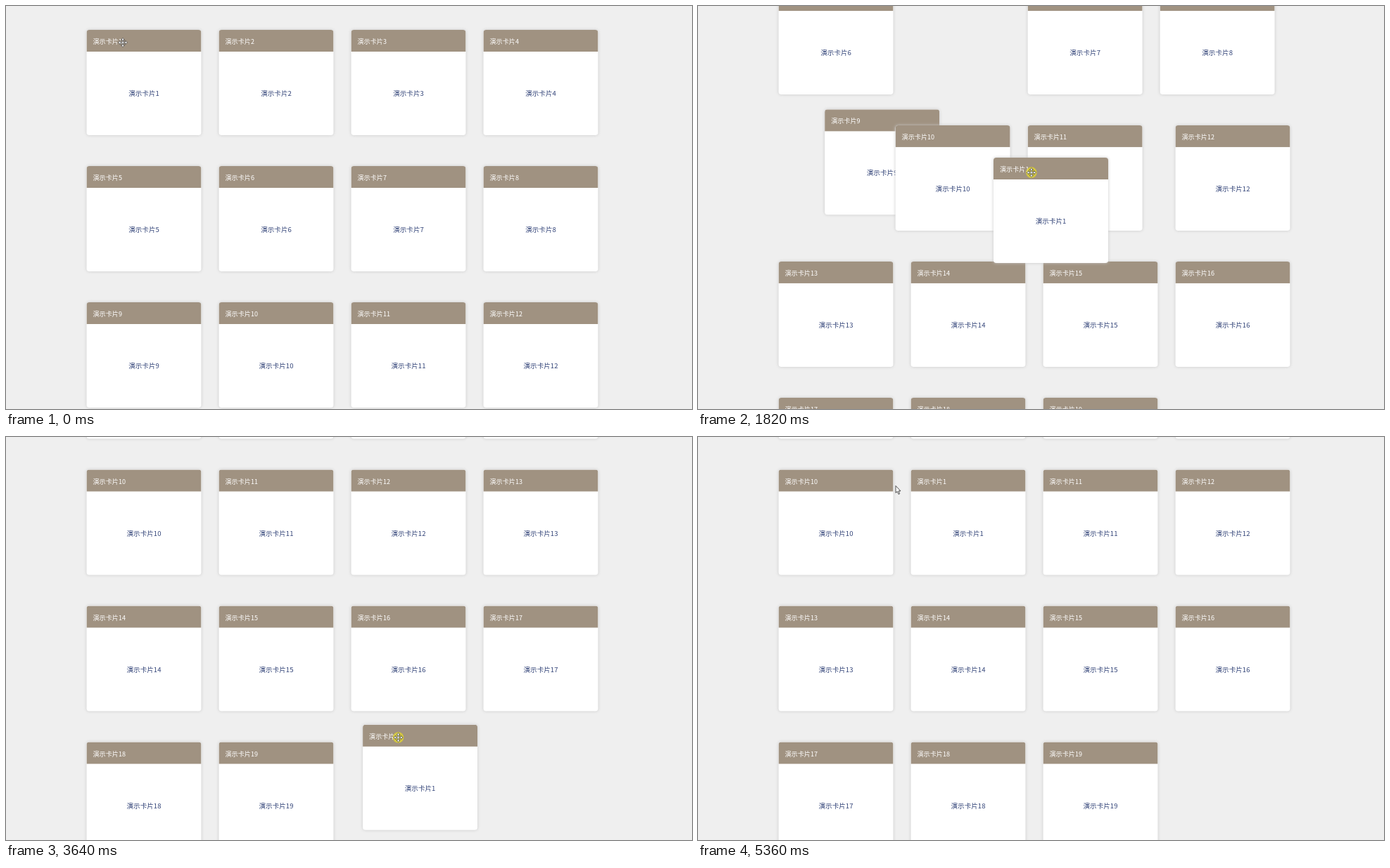
These frames come from a looping animation (975 px wide and 574 px high, 5.86 s). An HTML page:

```html
<!DOCTYPE html>
<html lang="zh-CN">
<head>
<meta charset="utf-8">
<title>卡片拖拽排序</title>
<style>
  html, body { margin: 0; width: 100%; height: 100%; overflow: hidden; }
  #stage { position: relative; width: 975px; height: 574px; overflow: hidden; background: #efefef;
    font-family: "Noto Sans CJK SC", "Noto Sans CJK", "Noto Sans", sans-serif; }
  .card { position: absolute; left: 0; top: 0; width: 163px; height: 150px; border-radius: 4px;
    background: #fff; box-shadow: 0 0 4px #c8c8c8; overflow: hidden; white-space: nowrap; }
  .head { height: 31.25px; line-height: 32.5px; padding-left: 9px; background: #a09281;
    color: #fff; font-size: 9.1px; }
  .body { height: 118.75px; line-height: 118.5px; text-align: center; color: #35467a; font-size: 9.6px; }
  svg { position: absolute; left: 0; top: 0; }
</style>
</head>
<body>
<div id="stage">
  <svg width="975" height="574">
    <g id="cursor">
      <circle id="press" r="7.8" fill="#ece020" fill-opacity=".65"/>
      <path id="move" fill="#fff" stroke="#333" stroke-width=".7"
        d="M0-6.5 2.5-3.7H.8V-.8H3.7V-2.5L6.5 0 3.7 2.5V.8H.8V3.7H2.5L0 6.5-2.5 3.7H-.8V.8H-3.7V2.5L-6.5 0-3.7-2.5V-.8H-.8V-3.7H-2.5Z"/>
      <path id="arrow" fill="#fff" stroke="#222" stroke-width=".8"
        d="M0 0V10L2.3 8 4 12 5.6 11.3 4 7.4H7Z"/>
    </g>
  </svg>
</div>
<script>
const LOOP = 5860, FRAME = 60, CARDS = 19, COLUMNS = 4;
const SLIDE = 300, TICK = 62.58, TICK_TIME = 150;
const W = 163, H = 150, HEAD = 31.25;
const PRESS = 370, RELEASE = 5000;
const GRIP = [51.5, 18], LEAD = 16;

const slotPos = s => [114.5 + 188 * (s % COLUMNS), 34 + 194 * Math.floor(s / COLUMNS)];

// Time and position of the dragged card on the screen
const drag = [
  [500, ...slotPos(0)],
  [1130, 322, 172],
  [1390, 373.5, 175.5],
  [1810, 420, 216],
  [2410, 574, 262],
  [2500, 592, 285],
  [3010, 530, 370],
  [3640, 505, 410],
  [4090, 287.5, 154.5],
  [4220, 258, 96],
  [4720, 298, 50],
  [RELEASE, 298, 50],
  [5330, 302.5, 46.5]
];

// Pointer once it has let go
const leave = [[RELEASE, 349.5, 68], [5220, 235, 69], [5350, 281, 69.5]];

// When the dragged card claims a new slot
const claims = [[1223, 5], [1776, 10], [2227, 14], [3100, 18], [3874, 14], [4024, 13], [4225, 9]];

const wheelTicks = [1220, 1364, 1480, 1590, 1795, 2600];

const $ = id => document.getElementById(id);
const clamp = v => Math.min(1, Math.max(0, v));
const mix = (a, b, p) => a + (b - a) * p;
const smooth = u => u * u * (3 - 2 * u);

// CSS "ease": cubic-bezier(.25, .1, .25, 1)
function ease(x) {
  if (x <= 0 || x >= 1) return clamp(x);
  let lo = 0, hi = 1;
  for (let i = 0; i < 20; i++) {
    const s = (lo + hi) / 2;
    if (.75 * s * (1 - s) + s ** 3 < x) lo = s; else hi = s;
  }
  return .3 * lo * (1 - lo) ** 2 + 3 * lo * lo * (1 - lo) + lo ** 3;
}

// Monotone cubic through one column of a list of keys
function track(keys, t, col) {
  const last = keys.length - 1;
  if (t <= keys[0][0]) return keys[0][col];
  if (t >= keys[last][0]) return keys[last][col];
  const i = keys.findIndex(k => k[0] > t) - 1;
  const secant = j => j < 0 || j >= last ? 0 : (keys[j + 1][col] - keys[j][col]) / (keys[j + 1][0] - keys[j][0]);
  const slope = j => {
    const a = secant(j - 1), b = secant(j);
    return a * b > 0 ? 2 * a * b / (a + b) : 0;
  };
  const [p, q] = [keys[i], keys[i + 1]], d = q[0] - p[0], u = (t - p[0]) / d;
  return mix(p[col], q[col], smooth(u)) +
    d * u * (1 - u) * (slope(i) * (1 - u) - slope(i + 1) * u);
}

const position = (keys, t) => [track(keys, t, 1), track(keys, t, 2)];
const scrollAt = t => wheelTicks.reduce((sum, start) => sum + TICK * smooth(clamp((t - start) / TICK_TIME)), 0);
const slotOf = (n, claimed) => n - 1 <= claimed ? n - 2 : n - 1;

// Page position of a card that makes room for the dragged one
function cardPos(n, t) {
  let slot = n - 1, from = slotPos(slot), to = from, start = 0;
  const at = time => from.map((v, i) => mix(v, to[i], ease((time - start) / SLIDE)));
  for (const [time, claimed] of claims) {
    if (time > t) break;
    const next = slotOf(n, claimed);
    if (next === slot) continue;
    from = at(time);
    to = slotPos(next);
    start = time;
    slot = next;
  }
  return at(t);
}

// The pointer runs ahead of the card it pulls, more so while the page scrolls
function pointerPos(t, held) {
  if (t > RELEASE) return position(leave, t);
  const [x, y] = position(drag, t - LEAD);
  return [
    held[0] + GRIP[0] + held[0] - x,
    held[1] + GRIP[1] + held[1] - y + scrollAt(t) - scrollAt(t - FRAME)
  ];
}

function makeCard(n) {
  const card = document.createElement('div');
  card.className = 'card';
  for (const part of ['head', 'body']) {
    const el = document.createElement('div');
    el.className = part;
    el.textContent = '演示卡片' + n;
    card.append(el);
  }
  $('stage').insertBefore(card, document.querySelector('svg'));
  return card;
}

// The dragged card comes last so that it lies on top
const numbers = Array.from({ length: CARDS }, (_, i) => (i + 1) % CARDS + 1);
const cards = numbers.map(makeCard);

const inside = ([x, y], [left, top], height) => x >= left && x <= left + W && y >= top && y <= top + height;
const show = (id, on) => $(id).setAttribute('visibility', on ? 'visible' : 'hidden');

function render(time) {
  const t = Math.max(0, Math.floor((time - 10) / FRAME) * FRAME + 10);
  const scroll = scrollAt(t), held = position(drag, t), pointer = pointerPos(t, held);
  const places = numbers.map(n => {
    if (n === 1) return held;
    const [x, y] = cardPos(n, t);
    return [x, y - scroll];
  });
  places.forEach(([x, y], i) => cards[i].style.transform = `translate(${x}px, ${y}px)`);

  const onHead = inside(pointer, held, H)
    ? inside(pointer, held, HEAD)
    : places.some(p => inside(pointer, p, HEAD));
  $('cursor').setAttribute('transform', `translate(${pointer})`);
  show('press', t >= PRESS && t < RELEASE);
  show('move', onHead);
  show('arrow', !onHead);
}

const begin = performance.now();
function tick() {
  render((performance.now() - begin) % LOOP);
  requestAnimationFrame(tick);
}
tick();
</script>
</body>
</html>
```
